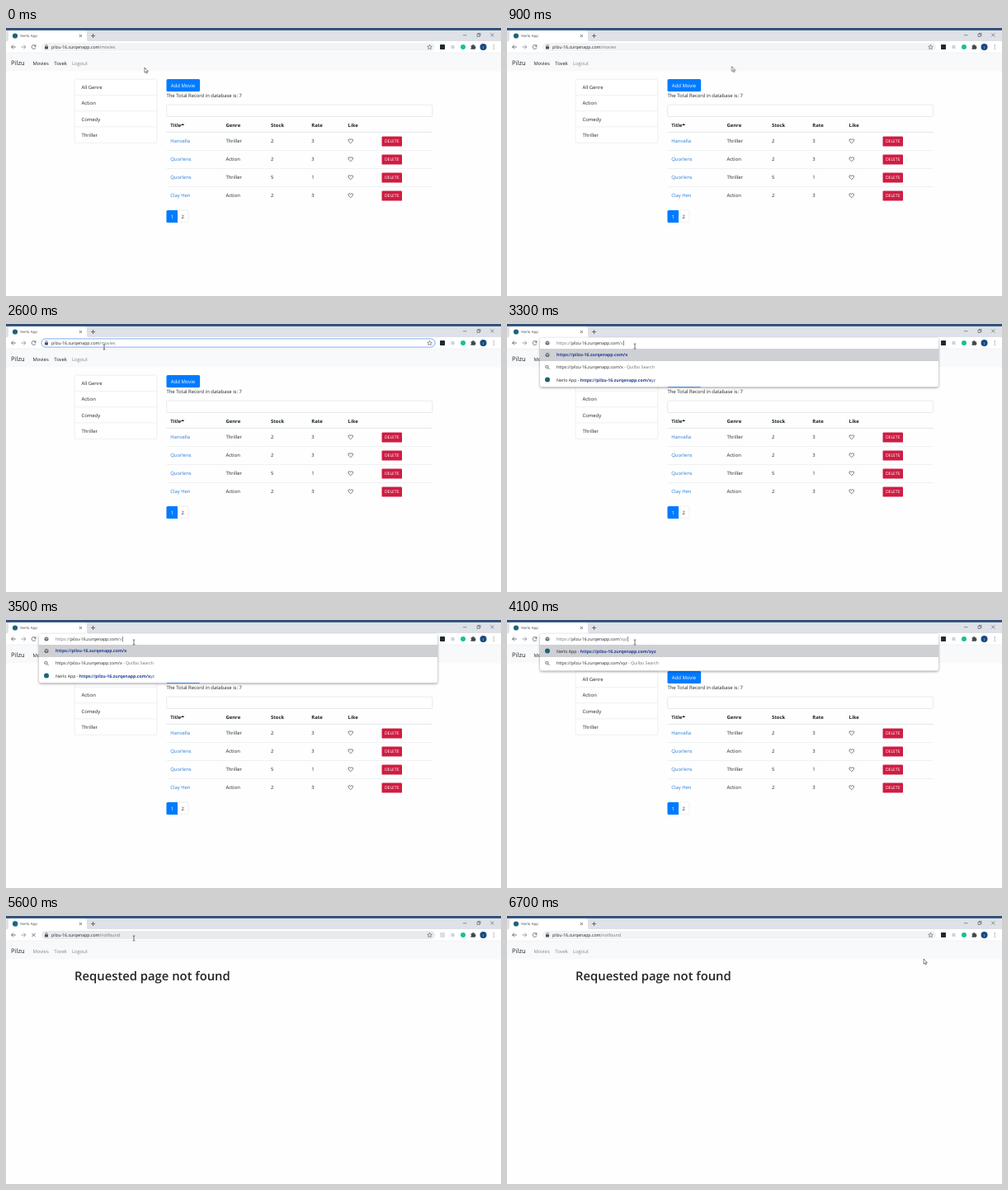
Write an HTML page that moves like this. It is 600 px wide and 325 px high and loops after 6800 ms.

```html
<!DOCTYPE html>
<html lang="en">
<head>
<meta charset="utf-8">
<title>Page not found demo</title>
<style>
  html, body { margin: 0; width: 100%; height: 100%; overflow: hidden; background: #fefefe; }
  svg { display: block; width: 100%; height: 100%; }
  text { font: 5.9px "Open Sans", "Noto Sans", sans-serif; fill: #212529; text-rendering: geometricPrecision; white-space: pre; }
  .brand { font-size: 7.6px; }
  .url { font-size: 5.2px; fill: #202124; }
  .dim { fill: #6a6e73; }
  .bold { font-weight: 700; }
  .title { font-size: 14.8px; font-weight: 600; }
  .match { font-weight: 700; fill: #1d3f94; }
  .link { fill: #2b7dd2; }
  .white { fill: #fff; }
  .mute { fill: #86888a; }
  .line { fill: none; stroke: #50545a; stroke-width: .8; }
  .thin { stroke-width: .6; }
  .edge { fill: #fff; stroke: #dcdfe2; stroke-width: .5; }

  /* Phases of the 6.8 s story */
  .idle, .focus, .drag, .typeX, .typeXY, .typeXYZ, .wait, .pending, .done, .busy, .ready,
  .lock, .list, .fav, .blank, .tool, .hover, .arrow, .beam {
    animation: 6.8s step-end infinite;
  }
  .idle { animation-name: idle; }
  .focus { animation-name: focus; }
  .drag { animation-name: drag; }
  .typeX { animation-name: typeX; }
  .typeXY { animation-name: typeXY; }
  .typeXYZ { animation-name: typeXYZ; }
  .wait { animation-name: wait; }
  .pending { animation-name: pending; }
  .done { animation-name: done; }
  .busy { animation-name: busy; }
  .ready { animation-name: ready; }
  .lock { animation-name: lock; }
  .list { animation-name: list; }
  .fav { animation-name: fav; }
  .blank { animation-name: blank; }
  .tool { animation-name: tool; }
  .hover { animation-name: hover; }
  .arrow { animation-name: arrow; }
  .beam { animation-name: beam; }
  @keyframes idle { 0% { visibility: visible } 48.52%, 100% { visibility: hidden } }
  @keyframes focus { 0%, 48.52% { visibility: hidden } 36.76% { visibility: visible } }
  @keyframes drag { 0%, 48.52% { visibility: hidden } 39.7% { visibility: visible } }
  @keyframes typeX { 0%, 54.41% { visibility: hidden } 48.52% { visibility: visible } }
  @keyframes typeXY { 0%, 57.35% { visibility: hidden } 54.41% { visibility: visible } }
  @keyframes typeXYZ { 0%, 63.23% { visibility: hidden } 57.35% { visibility: visible } }
  @keyframes wait { 0%, 73.52% { visibility: hidden } 63.23% { visibility: visible } }
  @keyframes pending { 0%, 77.94% { visibility: hidden } 63.23% { visibility: visible } }
  @keyframes done { 0% { visibility: hidden } 77.94%, 100% { visibility: visible } }
  @keyframes busy { 0%, 85.29% { visibility: hidden } 63.23% { visibility: visible } }
  @keyframes ready { 0%, 85.29% { visibility: visible } 63.23% { visibility: hidden } }
  @keyframes lock { 0%, 73.52% { visibility: visible } 48.52% { visibility: hidden } }
  @keyframes list { 0% { visibility: visible } 73.52%, 100% { visibility: hidden } }
  @keyframes fav { 0%, 73.52% { visibility: visible } 63.23% { visibility: hidden } }
  @keyframes blank { 0%, 85.29% { visibility: hidden } 73.52% { visibility: visible } }
  @keyframes tool { 0%, 85.29% { fill: #1d2a35 } 73.52% { fill: #dcdee1 } }
  @keyframes hover { 0%, 39.7%, 94.11% { fill: #f1f3f4 } 35.8%, 63.23% { fill: #e8eaed } }
  @keyframes arrow { 0%, 94.11% { visibility: visible } 35.8% { visibility: hidden } }
  @keyframes beam { 0%, 94.11% { visibility: hidden } 35.8% { visibility: visible } }

  .pointer { animation: move 6.8s ease-in-out infinite; }
  @keyframes move {
    0% { transform: translate(168px, 48px) }
    20.58%, 27.94% { transform: translate(310px, 46px) }
    36.76%, 39.7% { transform: translate(119px, 28px) }
    44.11%, 92.64% { transform: translate(155px, 27px) }
    98.52%, 100% { transform: translate(505px, 52px) }
  }
  .grow { transform-box: fill-box; animation: grow 6.8s ease-in-out infinite; }
  @keyframes grow {
    0%, 39.7% { transform: scaleX(.15) }
    42.5%, 100% { transform: scaleX(1) }
  }
  .spin { fill: none; stroke-width: .9; transform-box: fill-box; transform-origin: center; animation: spin .85s linear infinite; }
  .back { animation-direction: reverse; }
  @keyframes spin { to { transform: rotate(360deg) } }
  .popup { filter: drop-shadow(0 1px 1.5px rgba(0, 0, 0, .4)); }
</style>
</head>
<body>
<svg viewBox="0 0 600 325">
  <defs>
    <clipPath id="picked"><rect class="grow" x="115.4" y="18" width="19.5" height="10"/></clipPath>
    <g id="globe"><circle r="2.5" fill="#5f6368"/><path d="M-1.7-.9 0-.4.2 1.2M.6-1.7 1.7-.2" fill="none" stroke="#fff" stroke-width=".7"/></g>
    <path id="heart" d="M0 2.7C-1.4 1.4-2.8.3-2.8-1-2.8-2.7-.7-3 0-1.4.7-3 2.8-2.7 2.8-1 2.8.3 1.4 1.4 0 2.7Z" fill="none" stroke="#343a40" stroke-width=".65"/>
  </defs>

  <rect width="600" height="325" fill="#fefefe"/>
  <rect y="30" width="600" height="22.3" fill="#f8f9fa"/>

  <g class="list">
    <text x="6" y="45.3" class="brand">Pilzu</text>
    <text x="32.4" y="44.5">Movies</text>
    <text x="58.3" y="44.5">Tovek</text>
    <text x="79.9" y="44.5" class="mute">Logout</text>
    <g id="genres"></g>
    <rect x="194.5" y="62.1" width="40.6" height="14.8" rx="1.5" fill="#007bff"/>
    <text x="199.7" y="72" class="white" style="font-size:6px">Add Movie</text>
    <text x="194.5" y="84.2">The Total Record in database is: 7</text>
    <rect x="194.7" y="93.2" width="322" height="14.3" rx="1.5" class="edge" style="stroke:#ced4da"/>
    <g id="table"></g>
    <path d="M212 118h4.200l-2.100-2.300z" fill="#212529"/>
    <rect x="194.7" y="221" width="26.3" height="14.7" rx="1.5" class="edge"/>
    <path d="M208 221h-12q-1.500 0-1.500 1.500v12q0 1.500 1.500 1.500h12z" fill="#007bff"/>
    <text x="199.7" y="230.6" class="white">1</text>
    <text x="212.6" y="230.6">2</text>
  </g>

  <g class="done">
    <text x="6" y="45.3" class="brand">Pilzu</text>
    <text x="32.4" y="44.5" class="mute">Movies</text>
    <text x="58.3" y="44.5" class="mute">Tovek</text>
    <text x="79.9" y="44.5" class="mute">Logout</text>
    <text x="83.1" y="77.6" class="title">Requested page not found</text>
  </g>

  <!-- Browser window -->
  <rect width="600" height="17" fill="#dee1e6"/>
  <rect width="600" height="2.8" fill="#2b4d75"/>
  <path d="M0 16.5q3 0 3-3V6q0-3 3-3h89q3 0 3 3v7.5q0 3 3 3z" fill="#fff"/>
  <rect y="16" width="600" height="14" fill="#fff"/>
  <path d="M0 30H600" stroke="#e3e5e8" stroke-width=".5"/>
  <circle class="fav" cx="11" cy="9.5" r="3.1" fill="#1c6478"/>
  <g class="wait"><circle class="spin back" cx="11" cy="9.5" r="2.8" stroke="#a9adb2" stroke-dasharray="4 14"/></g>
  <g class="blank"><circle class="spin" cx="11" cy="9.5" r="3.2" stroke="#1a73e8" stroke-dasharray="13 8"/></g>
  <text x="17.2" y="11.3" style="font-size:4.4px;fill:#45494d">Nerlo App</text>
  <path class="line" d="M89 8l3 3m0-3-3 3M103 9.5h5M105.5 7v5"/>
  <path class="line thin" d="M554 8.7h4.5M571 7.4h3v3h-3zM572 7.4v-1h3v3h-1M587.3 6.5l4 4m0-4-4 4"/>
  <path class="line" d="M11.8 23H6.5M9 20.5 6.5 23 9 25.5"/>
  <path class="line" style="stroke:#85898e" d="M18.5 23h5.3M21.3 20.5l2.5 2.5-2.5 2.5"/>
  <g class="ready">
    <path class="line" d="M35.6 21.7A2.4 2.4 0 1 0 35.9 23.6"/>
    <path d="M36.3 20v2.5h-2.5z" fill="#50545a"/>
  </g>
  <path class="line busy" d="M31.5 21l4 4m0-4-4 4"/>

  <!-- Address bar -->
  <rect class="hover" x="43" y="18" width="477" height="10" rx="5" fill="#f1f3f4"/>
  <rect class="focus" x="42.9" y="17.9" width="477.2" height="10.2" rx="5.1" fill="#fff" stroke="#5c9bee" stroke-width=".8"/>
  <g class="lock">
    <rect x="47" y="22.2" width="4" height="3.2" rx=".4" fill="#4d5156"/>
    <path class="line thin" d="M47.9 22.2v-.8a1.1 1.1 0 0 1 2.2 0v.8"/>
  </g>
  <g class="wait">
    <circle class="line thin" cx="49" cy="23" r="2.3"/>
    <path class="line thin" d="M49 22.7v1.5M49 21.5v.6"/>
  </g>
  <text class="url idle" x="55" y="25">pilzu-16.zurqenapp.com<tspan class="dim">/movies</tspan></text>
  <g class="drag" clip-path="url(#picked)">
    <rect x="115" y="19.5" width="22" height="7" fill="#0078d7"/>
    <text class="url white" x="55" y="25">pilzu-16.zurqenapp.com/movies</text>
  </g>
  <text class="url pending" x="55" y="25">pilzu-16.zurqenapp.com<tspan class="dim">/xyz</tspan></text>
  <text class="url done" x="55" y="25">pilzu-16.zurqenapp.com<tspan class="dim">/notfound</tspan></text>
  <path class="line thin" d="M513.5 20.3l.8 1.8 2 .2-1.500 1.300.4 2-1.700-1-1.700 1 .4-2-1.500-1.300 2-.2z"/>

  <!-- Toolbar buttons -->
  <rect class="tool" x="526" y="20" width="6" height="6" rx=".7" fill="#1d2a35"/>
  <rect x="539.5" y="21" width="4" height="4" fill="#cfd2d6"/>
  <circle cx="554" cy="23" r="3" fill="#18c08f"/>
  <path d="M563.5 21.2h1.600a1.100 1.100 0 0 1 2.200 0h1.500v1.500a1.100 1.100 0 0 1 0 2.100v1h-5.300v-1.500a1 1 0 0 0 0-1.800z" fill="#45494e"/>
  <circle cx="578.5" cy="23" r="4" fill="#174a80"/>
  <text x="578.5" y="24.5" text-anchor="middle" class="white" style="font-size:4px">t</text>
  <g fill="#50545a"><circle cx="591.2" cy="20.7" r=".55"/><circle cx="591.2" cy="23" r=".55"/><circle cx="591.2" cy="25.3" r=".55"/></g>

  <g id="popups"></g>

  <g class="pointer">
    <path class="arrow" d="M0 0V6.2L1.5 4.9 2.5 7.1 3.4 6.7 2.5 4.6H4.4Z" fill="#fff" stroke="#222" stroke-width=".55"/>
    <path class="beam" d="M-1.3-2.9H1.3M0-2.9V2.9M-1.3 2.9H1.3" fill="none" stroke="#222" stroke-width=".6"/>
  </g>
</svg>
<script>
  const fill = (id, html) => { document.getElementById(id).innerHTML = html; };
  const text = (x, y, body, cls = "") => `<text x="${x}" y="${y}" class="${cls}">${body}</text>`;
  const rule = (x1, x2, y, w = 0.5) => `<path d="M${x1} ${y}H${x2}" stroke="#dee2e6" stroke-width="${w}"/>`;

  // Genre sidebar
  fill("genres", `<rect x="83.2" y="62.2" width="99.6" height="77" rx="1.5" class="edge"/>` +
    ["All Genre", "Action", "Comedy", "Thriller"].map((name, i) =>
      text(91.5, 74.1 + i * 19.2, name) + (i ? rule(83.2, 182.8, 62.2 + i * 19.2) : "")).join(""));

  // Movie table
  const cols = [199.2, 266.5, 321, 370.3, 414.6];
  const movies = [
    ["Hanvella", "Thriller", 2, 3],
    ["Quorlens", "Action", 2, 3],
    ["Quorlens", "Thriller", 5, 1],
    ["Clay Hen", "Action", 2, 3]
  ];
  const head = ["Title", "Genre", "Stock", "Rate", "Like"]
    .map((name, i) => text(cols[i], 119.6, name, "bold")).join("");
  const rows = movies.map((movie, r) => {
    const y = 139.1 + r * 22;
    return movie.map((cell, i) => text(cols[i], y, cell, i ? "" : "link")).join("") +
      `<use href="#heart" x="417.7" y="${y - 2}"/>` +
      `<rect x="455.5" y="${y - 7.7}" width="24.5" height="12.2" rx="1.2" fill="#ce1d43"/>` +
      `<text x="458.9" y="${y + 0.3}" class="white" style="font-size:5.1px">DELETE</text>` +
      (r ? rule(194.5, 516.8, y - 12.6) : "");
  }).join("");
  fill("table", head + rule(194.5, 516.8, 126.4, 0.8) + rows);

  // Address suggestions for each typed path
  const host = "pilzu-16.zurqenapp.com", full = "https://" + host + "/";
  const span = (cls, s) => `<tspan class="${cls}">${s}</tspan>`;
  const badge = y => `<circle cx="49" cy="${y}" r="3" fill="#1c6478"/>`;

  function popup(cls, path) {
    const exact = path === "xyz", caret = 141.2 + (path.length - 1) * 2.6;
    const page = y => badge(y) + text(60, y + 2, "Nerlo App - " + span("match", full + path) +
      `<tspan fill="#1d3f94">${"xyz".slice(path.length)}</tspan>`, "url");
    return `<g class="${cls}">
      <rect class="popup" x="40" y="16.8" width="483" height="${exact ? 44.7 : 59.4}" rx="2.5" fill="#fff"/>
      <rect x="40" y="30" width="483" height="15" fill="#cfd0d4"/>
      <use href="#globe" x="49" y="23"/>
      ${text(60, 25, span("dim", "https://") + host + span("dim", "/" + path), "url")}
      <rect x="${caret}" y="20" width=".5" height="6.3" fill="#222"/>
      ${exact ? page(37.5) : `<use href="#globe" x="49" y="37.5"/>` + text(60, 39.4, full + path, "url match")}
      <circle class="line" cx="48.4" cy="51.9" r="1.6"/><path class="line" d="M49.6 53.1l2 2"/>
      ${text(60, 54.4, full + path + span("dim", " - Quilbo Search"), "url")}
      ${exact ? "" : page(67.5)}
    </g>`;
  }
  fill("popups", popup("typeX", "x") + popup("typeXY", "xy") + popup("typeXYZ", "xyz"));
</script>
</body>
</html>
```
